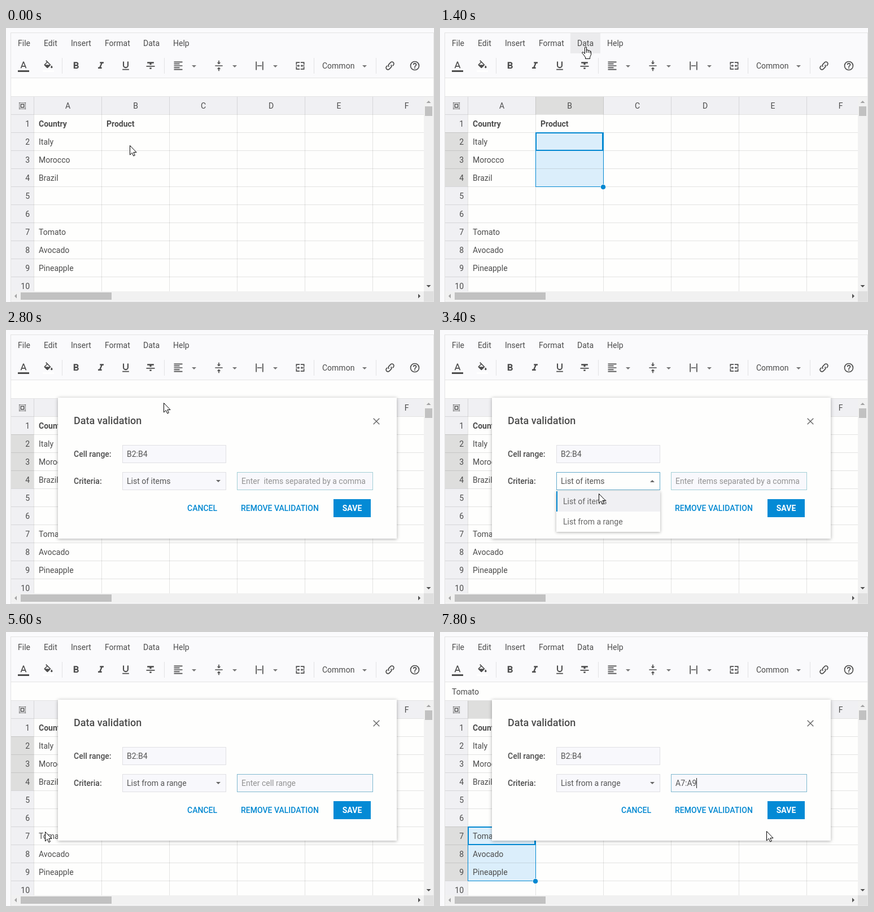
Write an HTML page with a canvas that moves like this. It is 758 by 486 pixels and loops after 8 s.

```html
<!DOCTYPE html>
<html lang="en">
<head>
<meta charset="utf-8">
<title>Spreadsheet data validation</title>
<style>
html, body { margin: 0; width: 100%; height: 100%; overflow: hidden; background: #fafafc; }
canvas { display: block; }
</style>
</head>
<body>
<canvas id="stage" width="758" height="486"></canvas>
<script>
const ctx = document.getElementById('stage').getContext('2d');
const LOOP = 8000, STEP = 200;
const INK = '#4c4c4c', BLUE = '#0288d1', PANEL = '#fafafc', PAPER = '#fefefd',
  HEAD = '#f0f0f3', MARKED = '#dededd', LINE = '#e4e4e4', FIELD = '#f8f8fc';

const icons = {
  textColor: 'M9.62,12L12,5.67L14.37,12M11,3L5.5,17H7.75L8.87,14H15.12L16.25,17H18.5L13,3H11Z',
  fill: 'M19,11.5C19,11.5 17,13.67 17,15A2,2 0 0,0 19,17A2,2 0 0,0 21,15C21,13.67 19,11.5 19,11.5M5.21,10L10,5.21L14.79,10M16.56,8.94L7.62,0L6.21,1.41L8.59,3.79L3.44,8.94C2.85,9.5 2.85,10.47 3.44,11.06L8.94,16.56C9.23,16.85 9.62,17 10,17C10.38,17 10.77,16.85 11.06,16.56L16.56,11.06C17.15,10.47 17.15,9.5 16.56,8.94Z',
  bold: 'M13.5,15.5H10V12.5H13.5A1.5,1.5 0 0,1 13.5,15.5M10,6.5H13A1.5,1.5 0 0,1 13,9.5H10M15.6,10.79C16.57,10.11 17.25,9 17.25,8C17.25,5.74 15.5,4 13.25,4H7V18H14.04C16.14,18 17.75,16.3 17.75,14.21C17.75,12.69 16.89,11.39 15.6,10.79Z',
  italic: 'M10,4V7H12.21L8.79,15H6V18H14V15H11.79L15.21,7H18V4Z',
  underline: 'M5,21H19V19H5M12,17A6,6 0 0,0 18,11V3H15.5V11A3.5,3.5 0 0,1 8.5,11V3H6V11A6,6 0 0,0 12,17Z',
  strike: 'M3,14H21V12H3M5,4V7H10V10H14V7H19V4M10,19H14V16H10Z',
  left: 'M3,3H21V5H3M3,7H15V9H3M3,11H21V13H3M3,15H15V17H3M3,19H21V21H3Z',
  middle: 'M8,19H11V23H13V19H16L12,15L8,19M16,5H13V1H11V5H8L12,9L16,5M4,11V13H20V11H4Z',
  width: 'M4,3H6V21H4M18,3H20V21H18M7,11H17V13H7Z',
  merge: 'M5,10H3V4H11V6H5M19,18H13V20H21V14H19M5,18V14H3V20H11V18M21,4H13V6H19V10H21M8,13V15L11,12L8,9V11H3V13M16,11V9L13,12L16,15V13H21V11Z',
  help: 'M11,18H13V16H11M12,6A4,4 0 0,0 8,10H10A2,2 0 0,1 14,10C14,12 11,11.75 11,15H13C13,12.75 16,12.5 16,10A4,4 0 0,0 12,6M12,2A10,10 0 0,0 12,22A10,10 0 0,0 12,2M12,4A8,8 0 0,1 12,20A8,8 0 0,1 12,4Z',
  tableCheck: 'M4,3H18A2,2 0 0,1 20,5V12.08C18.45,11.82 16.92,12.18 15.68,13H12V17H13.08C12.97,17.68 12.97,18.35 13.08,19H4A2,2 0 0,1 2,17V5A2,2 0 0,1 4,3M4,7V11H10V7M12,7V11H18V7M4,13V17H10V13M17.75,21L15,18L16.16,16.84L17.75,18.43L21.34,14.84L22.5,16.25Z',
  search: 'M9.5,3A6.5,6.5 0 0,1 16,9.5C16,11.11 15.41,12.59 14.44,13.73L14.71,14H15.5L20.5,19L19,20.5L14,15.5V14.71L13.73,14.44C12.59,15.41 11.11,16 9.5,16A6.5,6.5 0 0,1 9.5,3M9.5,5A4.5,4.5 0 0,0 9.5,14A4.5,4.5 0 0,0 9.5,5Z',
  filter: 'M6,13H18V11H6M3,6V8H21V6M10,18H14V16H10Z',
  sort: 'M10,13H22V11H10M10,19H22V17H10M10,7H22V5H10M6,7H8.5L5,3.5L1.5,7H4V17H1.5L5,20.5L8.5,17H6Z',
  link: 'M10 14.1a4 4 0 0 1-.1-5.6L13.4 4.9a4 4 0 0 1 5.7 5.7l-1.5 1.5M14 9.9a4 4 0 0 1 .1 5.6L10.6 19.1a4 4 0 0 1-5.7-5.7l1.5-1.5'
};
const pointers = {
  arrow: 'M.5 .5V17L4.3 13.4 6.8 19 9.3 17.9 6.9 12.5H12Z',
  hand: 'M-.5 2Q-.5 .5 1 .5Q2.5 .5 2.5 2V7Q2.5 5.6 4 5.8Q5.5 6 5.5 7.5Q5.7 6.4 7 6.6Q8.5 7 8.5 8.5Q8.8 7.7 9.8 8Q10.5 8.5 10.5 10V14.5L8.5 18.5V21.5H.5V19L-3 14-5.2 11.5Q-5.5 9.5-4 9.7Q-2.5 10-.5 12.5ZM2.5 7V11M5.5 7.5V11M8.5 8.5V11.5',
  beam: 'M-3-7.5H-1L.5-6.5 2-7.5H4M.5-6.5V6.5M-3 7.5H-1L.5 6.5 2 7.5H4'
};
for (const set of [icons, pointers])
  for (const key in set) set[key] = new Path2D(set[key]);

// time, x, y
const track = [
  [0, 219, 208], [200, 219, 209], [600, 222, 262], [800, 222, 262], [1400, 257, 33],
  [1800, 257, 33], [2400, 274, 60], [2600, 274, 60], [3200, 289, 266], [3400, 281, 290],
  [3800, 276, 334], [4000, 276, 334], [4600, 470, 268], [4800, 470, 268],
  [5600, 69, 354], [6000, 68, 360], [6600, 80, 423], [6800, 80, 423], [7800, 578, 353]
];

function pointerAt(t) {
  const i = track.findIndex(k => k[0] > t);
  if (i < 0) return track[track.length - 1].slice(1);
  const [t0, x0, y0] = track[i - 1], [t1, x1, y1] = track[i];
  const p = (t - t0) / (t1 - t0);
  return [Math.round(x0 + (x1 - x0) * p), Math.round(y0 + (y1 - y0) * p)];
}

function rect(x, y, w, h, color) {
  ctx.fillStyle = color;
  ctx.fillRect(x, y, w, h);
}

function frame(x, y, w, h, color, line = 1) {
  ctx.strokeStyle = color;
  ctx.lineWidth = line;
  ctx.strokeRect(x + line / 2, y + line / 2, w - line, h - line);
}

function text(s, x, mid, { color = INK, weight = 400, size = 14, align = 'left' } = {}) {
  ctx.font = `${weight} ${size}px Roboto, sans-serif`;
  ctx.textAlign = align;
  ctx.fillStyle = color;
  ctx.fillText(s, x, mid + Math.round(size * 0.36));
}

function icon(name, x, y, color = INK) {
  ctx.save();
  ctx.translate(x - 10, y - 10);
  ctx.scale(20 / 24, 20 / 24);
  ctx.fillStyle = ctx.strokeStyle = color;
  ctx.lineWidth = 2;
  if (name === 'link') ctx.stroke(icons.link);
  else ctx.fill(icons[name], 'evenodd');
  ctx.restore();
}

function triangle(x, y, angle, color, half = 4) {
  ctx.save();
  ctx.translate(x, y);
  ctx.rotate(angle * Math.PI / 2);
  ctx.fillStyle = color;
  ctx.beginPath();
  ctx.moveTo(-half, -half / 2);
  ctx.lineTo(half, -half / 2);
  ctx.lineTo(0, half / 2);
  ctx.fill();
  ctx.restore();
}

function raised(x, y, w, h, blur) {
  ctx.save();
  ctx.shadowColor = 'rgba(0,0,0,.32)';
  ctx.shadowBlur = blur;
  ctx.shadowOffsetY = 1;
  rect(x, y, w, h, PAPER);
  ctx.restore();
}

function drawBars(t) {
  rect(0, 0, 758, 486, PANEL);
  frame(8, 8, 750, 478, LINE);
  if (t >= 1400 && t < 2600) rect(231, 9, 53, 36, '#ebebed');
  [['File', 21], ['Edit', 67], ['Insert', 115], ['Format', 175], ['Data', 243], ['Help', 296]]
    .forEach(([s, x]) => text(s, x, 27));
  [['textColor', 31], ['fill', 75], ['bold', 124], ['italic', 168], ['underline', 212],
   ['strike', 256], ['left', 305], ['middle', 377], ['width', 449], ['merge', 521],
   ['link', 680], ['help', 724]].forEach(([name, x]) => icon(name, x, 67));
  rect(21, 75, 20, 3, INK);
  rect(65, 75, 20, 3, '#fff');
  [99, 280, 545, 655].forEach(x => rect(x, 53, 1, 28, '#e2e2e4'));
  [333, 405, 477, 635].forEach(x => triangle(x, 68, 0, '#777'));
  text('Common', 560, 67);
  rect(9, 88, 748, 1, LINE);
  rect(9, 89, 748, 32, PAPER);
  rect(9, 121, 748, 1, LINE);
  if (t >= 6000) text('Tomato', 21, 106);
}

function selectionAt(t) {
  if (t < 200) return null;
  if (t < 6000) return { col: 1, row: 2, count: t < 400 ? 1 : t < 600 ? 2 : 3 };
  return { col: 0, row: 7, count: t < 6200 ? 1 : t < 6400 ? 2 : 3 };
}

function drawSheet(sel) {
  const colX = c => 49 + c * 120, rowY = r => 121 + r * 32;
  ctx.save();
  ctx.beginPath();
  ctx.rect(9, 122, 731, 345);
  ctx.clip();
  rect(9, 122, 731, 345, PAPER);
  rect(9, 122, 731, 31, HEAD);
  rect(9, 122, 40, 345, HEAD);
  if (sel) {
    rect(colX(sel.col), 122, 121, 31, MARKED);
    rect(9, rowY(sel.row), 40, sel.count * 32, MARKED);
    rect(colX(sel.col), rowY(sel.row), 120, sel.count * 32, '#dbeefb');
  }
  ctx.globalCompositeOperation = 'multiply';
  for (let c = 0; c < 6; c++) rect(colX(c), 122, 1, 345, LINE);
  for (let r = 1; r < 11; r++) rect(9, rowY(r), 731, 1, LINE);
  ctx.globalCompositeOperation = 'source-over';

  [...'ABCDEF'].forEach((s, c) => text(s, colX(c) + 60.5, 138, { align: 'center' }));
  for (let r = 1; r <= 10; r++) text(r, 42, rowY(r) + 17, { align: 'right' });
  ['Country', 'Italy', 'Morocco', 'Brazil', '', '', 'Tomato', 'Avocado', 'Pineapple']
    .forEach((s, r) => text(s, 58, rowY(r + 1) + 17, { weight: r ? 400 : 700 }));
  text('Product', 178, 170, { weight: 700 });

  if (sel) {
    const x = colX(sel.col), y = rowY(sel.row), h = sel.count * 32;
    frame(x, y, 121, h + 1, BLUE);
    frame(x, y, 120, 33, BLUE, 2);
    ctx.beginPath();
    ctx.arc(x + 120, y + h + 1, 5, 0, 7);
    ctx.fillStyle = PAPER;
    ctx.fill();
    ctx.beginPath();
    ctx.arc(x + 120, y + h + 1, 4.3, 0, 7);
    ctx.fillStyle = BLUE;
    ctx.fill();
  }
  for (let i = 0; i < 5; i++) {
    const d = i * 8 / 3;
    for (const [x, y] of [[d, 0], [d, 32 / 3], [0, d], [32 / 3, d]])
      rect(23 + x, 132 + y, 1.4, 1.4, INK);
  }
  frame(25.7, 134.7, 6.7, 6.7, INK, 1.4);
  ctx.restore();
}

function drawScrollbars() {
  rect(740, 122, 17, 345, '#f1f1f1');
  rect(9, 467, 731, 17, '#f1f1f1');
  rect(740, 467, 17, 18, '#dfdfdf');
  rect(742, 139, 13, 17, '#c1c1c1');
  rect(26, 469, 161, 13, '#c1c1c1');
  triangle(748.5, 131, 2, '#a3a3a3');
  triangle(748.5, 458, 0, '#505050');
  triangle(17, 475.5, 1, '#a3a3a3');
  triangle(732, 475.5, 3, '#505050');
}

function drawMenu(py) {
  raised(231, 45, 180, 144, 5);
  if (py >= 45) rect(231, 45, 180, 36, HEAD);
  [['tableCheck', 'Data validation'], ['search', 'Search'], ['filter', 'Filter'], ['sort', 'Sort']]
    .forEach(([name, label], i) => {
      icon(name, 249, 63 + i * 36, '#777');
      text(label, 267, 63 + i * 36, { color: '#5a5a5a' });
    });
  triangle(393, 171, 3, '#666', 3.2);
}

function field(x, w, y, value, { border = '#e0e0e4', back = FIELD, color = '#555' } = {}) {
  rect(x, y, w, 32, back);
  frame(x, y, w, 32, border);
  text(value, x + 8, y + 16, { color });
}

function drawDialog(t, py) {
  const open = t >= 3200 && t < 4200, fromRange = t >= 4200;
  const last = { 6000: 'A7', 6200: 'A7:A8' }[t] || 'A7:A9';
  const value = t >= 6000 ? last : '';
  raised(92, 120, 600, 250, 6);
  text('Data validation', 120, 161, { size: 18, weight: 500 });
  ctx.strokeStyle = '#666';
  ctx.lineWidth = 1.4;
  ctx.stroke(new Path2D('M650.7 156.7L661.3 167.3M661.3 156.7L650.7 167.3'));
  text('Cell range:', 120, 220, { weight: 500 });
  text('Criteria:', 120, 268, { weight: 500 });
  field(206, 184, 204, 'B2:B4');
  field(206, 184, 252, fromRange ? 'List from a range' : 'List of items',
    open ? { border: '#62aacb', back: PAPER } : {});
  triangle(376, 268, open ? 2 : 0, '#666');
  const hint = fromRange ? 'Enter cell range' : 'Enter  items separated by a comma';
  field(409, 241, 252, value || hint,
    { border: fromRange ? '#7fb8cf' : '#a3cfd6', color: value ? '#555' : '#929292' });
  if (value) {
    ctx.font = '400 14px Roboto, sans-serif';
    rect(Math.round(417 + ctx.measureText(value).width), 259, 1, 18, '#222');
  }
  text('CANCEL', 321, 316, { color: BLUE, weight: 500 });
  text('REMOVE VALIDATION', 416, 316, { color: BLUE, weight: 500 });
  rect(580, 300, 66, 32, '#048ad5');
  text('SAVE', 613, 316, { color: '#fff', weight: 700, align: 'center' });

  if (open) {
    raised(206, 286, 184, 72, 5);
    const second = py >= 322;
    rect(206, second ? 322 : 286, 184, 36, HEAD);
    rect(206, second ? 322 : 286, 2, 36, BLUE);
    text('List of items', 218, 304, { color: '#666' });
    text('List from a range', 218, 340, { color: '#666' });
  }
}

function drawPointer(t, x, y) {
  const beam = t >= 4600 && t < 5200;
  const hand = t >= 1400 && t <= 2400;
  const shape = pointers[beam ? 'beam' : hand ? 'hand' : 'arrow'];
  ctx.save();
  ctx.translate(x, y);
  ctx.fillStyle = '#fff';
  ctx.strokeStyle = '#000';
  ctx.lineWidth = 1;
  ctx.lineJoin = 'round';
  if (!beam) ctx.fill(shape);
  ctx.stroke(shape);
  ctx.restore();
}

function draw() {
  const t = Math.floor(performance.now() % LOOP / STEP) * STEP;
  const [x, y] = pointerAt(t);
  drawBars(t);
  drawSheet(selectionAt(t));
  drawScrollbars();
  if (t >= 1600 && t < 2600) drawMenu(y);
  if (t >= 2600) drawDialog(t, y);
  drawPointer(t, x, y);
  requestAnimationFrame(draw);
}
draw();
</script>
</body>
</html>
```
